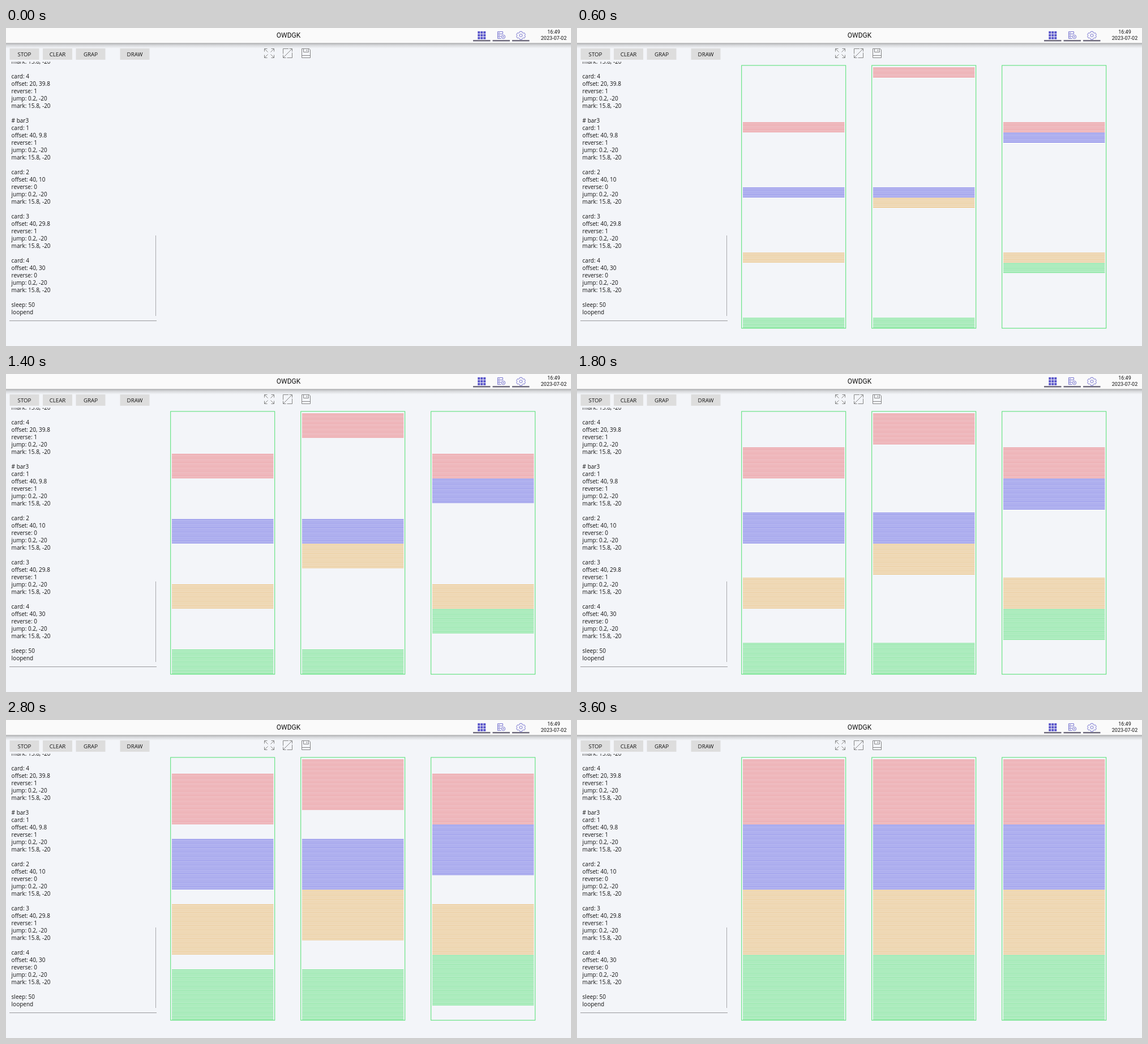
Recreate the animation shown at these times as an HTML page. Size 998 by 561 pixels, loop 3.8 s.

```html
<!DOCTYPE html>
<html lang="en">
<head>
<meta charset="utf-8">
<title>OWDGK</title>
<style>
  html, body { margin: 0; width: 100%; height: 100%; overflow: hidden; background: #f3f5f9; }
  svg { display: block; }
  text { fill: #111; }
  .ui { font-family: Roboto, sans-serif; text-anchor: middle; }
  .script { font: 10px "Open Sans", "Noto Sans", sans-serif; }
  .button { font: 9.7px "Open Sans", "Noto Sans", sans-serif; text-anchor: middle; }
  .nav { fill: none; stroke: #7572cf; }
  .tool { fill: none; stroke: #858585; }
</style>
</head>
<body>
<svg id="stage" width="998" height="561" viewBox="0 0 998 561">
  <defs>
    <linearGradient id="shade" x2="0" y2="1">
      <stop offset="0" stop-color="#777" stop-opacity=".72"/>
      <stop offset=".35" stop-color="#888" stop-opacity=".32"/>
      <stop offset="1" stop-color="#999" stop-opacity="0"/>
    </linearGradient>
    <clipPath id="panel"><rect x="6" y="59.5" width="260" height="457"/></clipPath>
  </defs>

  <rect width="998" height="561" fill="#f3f5f9"/>
  <rect y="26" width="998" height="10" fill="url(#shade)"/>
  <rect width="998" height="26.5" fill="#fafafa"/>
  <g class="ui">
    <text x="499" y="17.2" font-size="12">OWDGK</text>
    <text x="967.5" y="10.4" font-size="9">16:49</text>
    <text x="967.5" y="21.4" font-size="9">2023-07-02</text>
  </g>

  <g id="grid" fill="#5753c9"></g>
  <g class="nav">
    <path d="M877.5 10V6.5h-9v4h9M868.5 10.5v4h6M868.5 14.5v4h6M870 8.5h2M870 12.5h2M870 16.5h2"/>
    <circle cx="878.5" cy="15.5" r="3.2"/>
    <circle cx="878.5" cy="15.5" r=".8"/>
    <path d="M907.6 6.2h3.8l.7 2 1.4.8 2.1-.4 1.8 3.1-1.4 1.5 1.4 1.6-1.8 3.1-2.1-.4-1.4.8-.7 1.9h-3.8l-.7-1.9-1.4-.8-2.1.4-1.8-3.1 1.4-1.6-1.4-1.5 1.8-3.1 2.1.4 1.4-.8z"/>
    <circle cx="909.5" cy="13.1" r="2.5"/>
  </g>
  <path d="M825 22.4h30.5M859.5 22.4H890M894 22.4h30.5" stroke="#625e72" stroke-width="2.4"/>

  <g class="tool">
    <path d="M456.5 41.5v-5h5M468.5 36.5h5v5M473.5 47.5v5h-5M461.5 52.5h-5v-5M457 37l5.5 5.5M473 37l-5.5 5.5M473 52l-5.5-5.5M457 52l5.5-5.5"/>
    <path d="M499 36.5h-9.500v9M505.500 43.500v9h-9M500.500 36.500h5v5M505 37l-15 15M489.500 47.500v5h5"/>
    <path d="M522.5 36.5h13l2 2v14h-15zM525.500 36.500v6h9v-6M531.500 38v3M522.500 48.500h15"/>
  </g>

  <g id="buttons"></g>
  <g id="script" class="script" clip-path="url(#panel)"></g>
  <path d="M264.500 366v142" stroke="#a9a9ac"/>
  <path d="M6 516.500h260" stroke="#98989b"/>
  <g id="plot" fill="none"></g>
</svg>

<script>
const $ = id => document.getElementById(id);

function add(parent, tag, attrs, text = '') {
  const el = document.createElementNS('http://www.w3.org/2000/svg', tag);
  for (const name in attrs) el.setAttribute(name, attrs[name]);
  el.textContent = text;
  parent.append(el);
  return el;
}

for (let i = 0; i < 9; i++) {
  add($('grid'), 'rect', { x: 833.3 + i % 3 * 5, y: 5.8 + Math.floor(i / 3) * 5, width: 4, height: 4 });
}

[['STOP', 6.5], ['CLEAR', 65], ['GRAP', 123.5], ['DRAW', 201.5]].forEach(([label, x]) => {
  add($('buttons'), 'rect', { x, y: 36, width: 52, height: 20, fill: '#dddddd' });
  add($('buttons'), 'text', { class: 'button', x: x + 26, y: 49.5 }, label);
});

const card = (id, offset, reverse) => [
  `card: ${id}`, `offset: ${offset}`, `reverse: ${reverse}`, 'jump: 0.2, -20', 'mark: 15.8, -20', ''
];
[
  'mark: 15.8, -20', '',
  ...card(4, '20, 39.8', 1),
  '# bar3',
  ...card(1, '40, 9.8', 1),
  ...card(2, '40, 10', 0),
  ...card(3, '40, 29.8', 1),
  ...card(4, '40, 30', 0),
  'sleep: 50', 'loopend'
].forEach((line, i) => add($('script'), 'text', { x: 9.6, y: 62.5 + i * 13 }, line));

// Each bar holds four cards of 50 lines; 1 fills downwards, 0 upwards.
const PITCH = 2.3, LINES = 50, TOP = 70.4;
const COLORS = ['#e9686d', '#5555e2', '#e9b25c', '#4fdf70'];
const BARS = [[0, 0, 0, 0], [1, 0, 1, 0], [0, 1, 0, 1]];
const COUNTS = [0, 2, 5, 8, 11, 13, 16, 19, 21, 24, 27, 30, 33, 36, 39, 42, 44, 47, 50];
const STEP = 200;

const cards = BARS.flatMap((directions, bar) => {
  const x = 290.7 + bar * 230;
  add($('plot'), 'rect', { x, y: 66, width: 184, height: 463.7, stroke: '#4fe070' });
  return directions.map((down, i) => ({
    x: x + PITCH,
    first: i * LINES,
    down,
    path: add($('plot'), 'path', { stroke: COLORS[i] })
  }));
});

let shown = -1;
function draw(now) {
  const step = Math.floor(now / STEP) % COUNTS.length;
  if (step !== shown) {
    shown = step;
    $('plot').style.display = step ? '' : 'none';
    for (const { x, first, down, path } of cards) {
      let d = '';
      for (let i = 0; i < COUNTS[step]; i++) {
        const row = first + (down ? i : LINES - 1 - i);
        d += `M${x} ${(TOP + row * PITCH).toFixed(1)}h179.4`;
      }
      path.setAttribute('d', d);
    }
  }
}

const start = performance.now();
function tick() {
  draw(performance.now() - start);
  requestAnimationFrame(tick);
}
tick();
</script>
</body>
</html>
```
